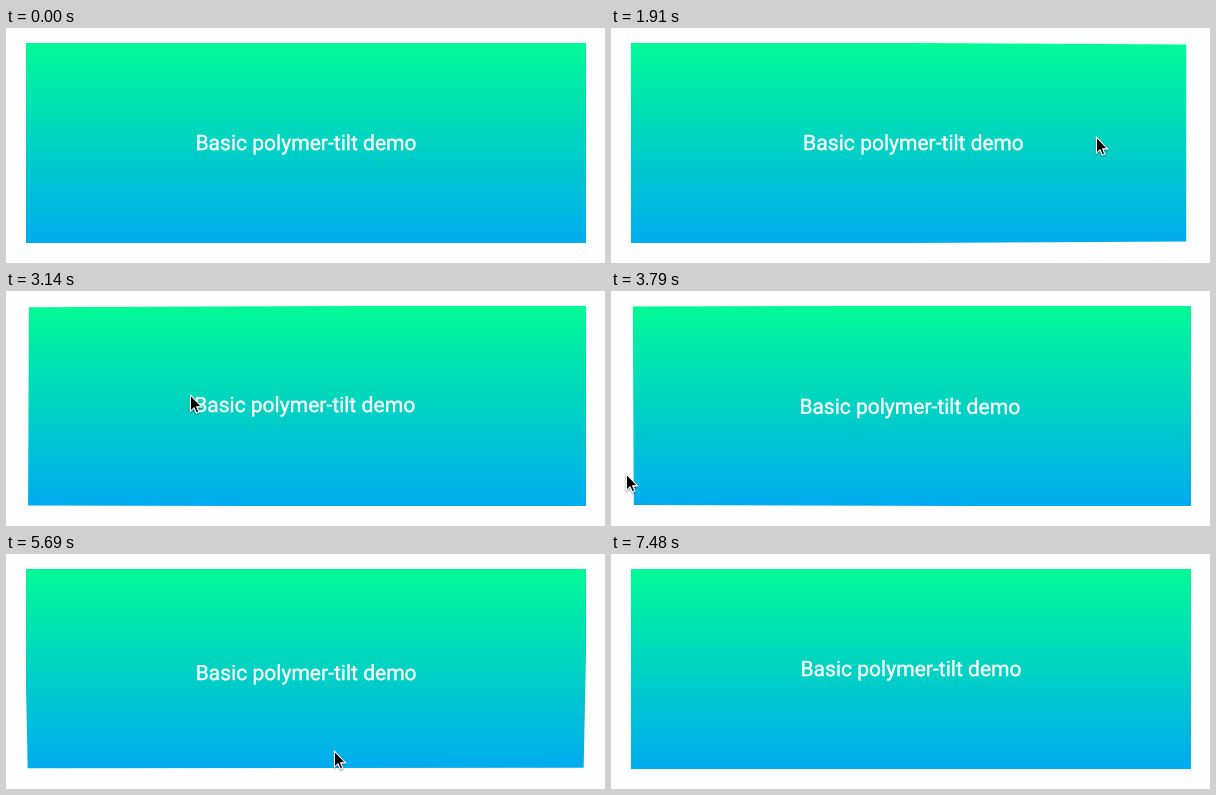
Animation of 599x235 px, one loop 7640 ms. Source, as an HTML page with a canvas:

```html
<!DOCTYPE html>
<html lang="en">
<head>
<meta charset="utf-8">
<title>Tilt demo</title>
<style>
  html, body { margin: 0; width: 100%; height: 100%; overflow: hidden; background: #fefefe; }
  canvas { display: block; }
</style>
</head>
<body>
<canvas id="stage" width="599" height="235"></canvas>
<script>
const LOOP = 7640, MAX_TILT = Math.PI / 18, LAG = 55, STEP = 10;
const LEFT = 20, TOP = 15, W = 560, H = 200;
const CX = LEFT + W / 2, CY = TOP + H / 2;
const PERSPECTIVE = 1000, LIFT = 50, BASELINE = 6.6;
const WORDS = ['Basic', 'polymer-tilt', 'demo'];

const ctx = document.getElementById('stage').getContext('2d');
const arrow = new Path2D('M.5 .5V16L4.1 12.6L6.3 17.8L8.7 16.8L6.5 11.7H11.3Z');

// Pointer stops: time in ms, x, y
const path = [
  [270, 417, 236], [580, 409, 222], [880, 409, 222], [1260, 412, 194],
  [2000, 488, 100], [2600, 368, 61], [3740, 20, 178], [4050, 2, 200],
  [4440, 47, 183], [5000, 110, 205], [5690, 328, 197], [6800, 573, 178],
  [7160, 563, 238]
];

function slope(i, axis) {
  const a = path[i], b = path[i + 1];
  return (b[axis] - a[axis]) / (b[0] - a[0]);
}

// Harmonic mean keeps the curve from overshooting its stops
function tangent(i, axis) {
  if (i === 0) return slope(0, axis);
  if (i === path.length - 1) return slope(i - 1, axis);
  const p = slope(i - 1, axis), q = slope(i, axis);
  return p * q > 0 ? 2 * p * q / (p + q) : 0;
}

function pointer(t) {
  const end = path[path.length - 1];
  if (t <= path[0][0]) return path[0].slice(1);
  if (t >= end[0]) return end.slice(1);
  const i = path.findIndex(p => p[0] > t) - 1;
  const a = path[i], b = path[i + 1], d = b[0] - a[0], u = (t - a[0]) / d;
  return [1, 2].map(k =>
    a[k] * (1 + 2 * u) * (1 - u) ** 2 + b[k] * u * u * (3 - 2 * u) +
    d * u * (1 - u) * (tangent(i, k) * (1 - u) - tangent(i + 1, k) * u));
}

function target(t) {
  const [px, py] = pointer(t);
  const x = (px - CX) / W, y = (py - CY) / H;
  return Math.max(Math.abs(x), Math.abs(y)) <= .5 ? [x, y] : [0, 0];
}

// Tilt trails the pointer with an exponential lag
function tilt(t) {
  let x = 0, y = 0, sum = 0;
  for (let age = 0; age <= 400; age += STEP) {
    const w = Math.exp(-age / LAG), [tx, ty] = target(t - age);
    x += w * tx; y += w * ty; sum += w;
  }
  return [x / sum * MAX_TILT, y / sum * MAX_TILT];
}

// Maps a point of the tilted card to the stage
function projector(ax, ay) {
  const sx = Math.sin(ax), cx = Math.cos(ax), sy = Math.sin(ay), cy = Math.cos(ay);
  return (x, y, z = 0) => {
    const depth = z * cx - x * sx;
    const s = PERSPECTIVE / (PERSPECTIVE - depth * cy + y * sy);
    return [CX + s * (x * cx + z * sx), CY + s * (y * cy + depth * sy)];
  };
}

function drawCard(project) {
  const w = W / 2, h = H / 2;
  const fill = ctx.createLinearGradient(...project(0, -h), ...project(0, h));
  fill.addColorStop(0, '#00fa96');
  fill.addColorStop(1, '#00abef');
  ctx.save();
  ctx.beginPath();
  ctx.rect(LEFT, TOP, W, H);
  ctx.clip();
  ctx.beginPath();
  for (const [x, y] of [[-w, -h], [w, -h], [w, h], [-w, h]]) ctx.lineTo(...project(x, y));
  ctx.fillStyle = fill;
  ctx.fill();
  ctx.restore();
}

// Each word gets its own affine fit of the perspective
function drawLabel(project) {
  ctx.save();
  ctx.font = '20px Roboto, sans-serif';
  ctx.textRendering = 'geometricPrecision';
  ctx.fillStyle = ctx.strokeStyle = '#fff';
  ctx.lineWidth = .35;
  ctx.lineJoin = 'round';
  let x = -ctx.measureText(WORDS.join(' ')).width / 2;
  for (const word of WORDS) {
    const w = ctx.measureText(word).width;
    const p = project(x, BASELINE, LIFT), q = project(x + w, BASELINE, LIFT);
    const mid = project(x + w / 2, BASELINE, LIFT), up = project(x + w / 2, BASELINE - 10, LIFT);
    ctx.setTransform((q[0] - p[0]) / w, (q[1] - p[1]) / w,
      (mid[0] - up[0]) / 10, (mid[1] - up[1]) / 10, p[0], p[1]);
    ctx.fillText(word, 0, 0);
    ctx.strokeText(word, 0, 0);
    x += w + ctx.measureText(' ').width;
  }
  ctx.restore();
}

function drawCursor(x, y) {
  ctx.save();
  ctx.translate(Math.round(x), Math.round(y));
  ctx.shadowColor = 'rgba(0, 0, 0, .4)';
  ctx.shadowBlur = 2;
  ctx.shadowOffsetY = 1;
  ctx.fillStyle = '#fff';
  ctx.fill(arrow);
  ctx.strokeStyle = '#fff';
  ctx.lineWidth = 1.4;
  ctx.stroke(arrow);
  ctx.shadowColor = 'transparent';
  ctx.fillStyle = '#000';
  ctx.fill(arrow);
  ctx.lineWidth = 1;
  ctx.stroke(arrow);
  ctx.restore();
}

function draw(t) {
  const project = projector(...tilt(t));
  ctx.fillStyle = '#fefefe';
  ctx.fillRect(0, 0, 599, 235);
  drawCard(project);
  drawLabel(project);
  drawCursor(...pointer(t));
}

const start = performance.now();
function tick() {
  draw((performance.now() - start) % LOOP);
  requestAnimationFrame(tick);
}
tick();
</script>
</body>
</html>
```
